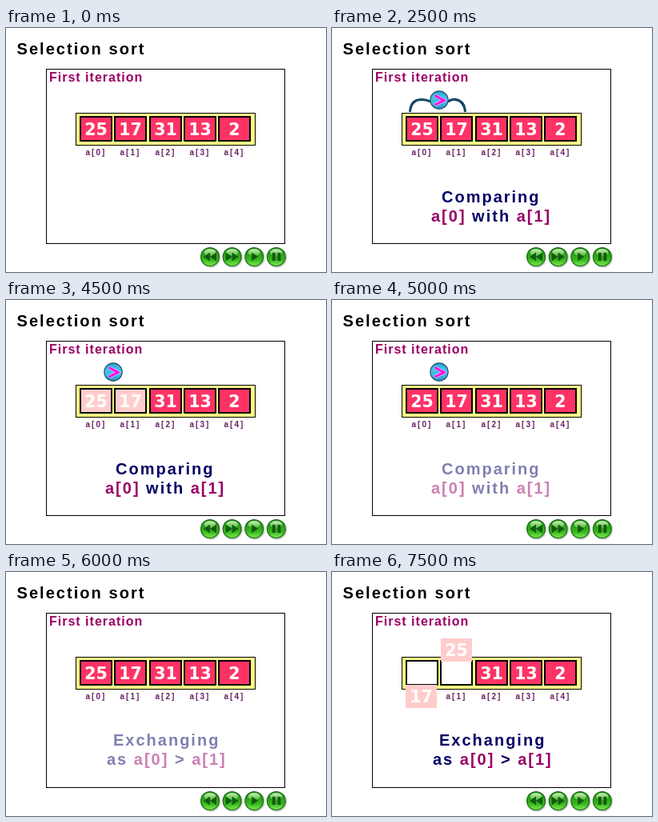
Animation, 400 px wide and 305 px high, one loop 8 s. Source, as an HTML page with a canvas:

```html
<!DOCTYPE html>
<html lang="en">
<head>
<meta charset="utf-8">
<title>Selection sort</title>
<style>
html, body { margin: 0; width: 400px; height: 305px; overflow: hidden; background: #fff; }
canvas { display: block; }
</style>
</head>
<body>
<canvas id="stage" width="400" height="305"></canvas>
<script>
const ctx = document.getElementById('stage').getContext('2d');
const LOOP = 8000, STEP = 500;
const SANS = '"Liberation Sans", Arial, sans-serif';
const WIDE = '"DejaVu Sans", Verdana, sans-serif';
const NAVY = '#000066', PLUM = '#990066', RED = '#ff3366', PALE = '#ffcccc';
const values = [25, 17, 31, 13, 2];
const cellX = i => Math.round(92 + i * 43.3);

// Draws [text, colour] runs on one baseline.
function runs(parts, x, y, size, spacing) {
  ctx.font = `bold ${size}px ${SANS}`;
  ctx.letterSpacing = spacing + 'px';
  ctx.textAlign = 'left';
  for (const [text, color] of parts) {
    ctx.fillStyle = color;
    ctx.fillText(text, x, y);
    x += ctx.measureText(text).width;
  }
}

function rect(x, y, w, h, color) {
  ctx.fillStyle = color;
  ctx.fillRect(x, y, w, h);
}

function disc(x, y, r, fill) {
  ctx.beginPath();
  ctx.arc(x, y, r, 0, Math.PI * 2);
  ctx.fillStyle = fill;
  ctx.fill();
}

function line(points, color, width) {
  ctx.beginPath();
  points.forEach(([x, y]) => ctx.lineTo(x, y));
  ctx.strokeStyle = color;
  ctx.lineWidth = width;
  ctx.stroke();
}

function number(n, x, y) {
  ctx.font = `bold 20.5px ${WIDE}`;
  ctx.letterSpacing = '0px';
  ctx.textAlign = 'center';
  ctx.fillStyle = '#fff';
  ctx.fillText(n, x, y);
}

function tile(n, x, y) {
  rect(x, y, 39, 29, PALE);
  number(n, x + 19.5, y + 22);
}

function gradient(x, y, r, stops) {
  const g = ctx.createLinearGradient(x, y - r, x, y + r);
  stops.forEach((c, i) => g.addColorStop(i / (stops.length - 1), c));
  return g;
}

function triangle(x, y, dir) {
  ctx.beginPath();
  ctx.moveTo(x, y - 5.5);
  ctx.lineTo(x + 8 * dir, y);
  ctx.lineTo(x, y + 5.5);
  ctx.fill();
}

function button(x, kind) {
  const y = 286;
  disc(x + 0.8, y + 1.2, 12.5, '#c9cec6');
  disc(x, y, 12, '#176b10');
  disc(x, y, 10.8, gradient(x, y, 11, ['#259316', '#2aa019', '#38b51e', '#78ed4b']));
  ctx.beginPath();
  ctx.ellipse(x, y - 5.5, 7.5, 4.3, 0, 0, Math.PI * 2);
  ctx.fillStyle = gradient(x, y - 5.5, 5, ['#d4f5c8', '#48b52c']);
  ctx.fill();
  ctx.fillStyle = '#125d0d';
  if (kind === 'rewind') { triangle(x, y, -1); triangle(x + 8, y, -1); }
  if (kind === 'forward') { triangle(x - 8, y, 1); triangle(x, y, 1); }
  if (kind === 'play') triangle(x - 3, y, 1);
  if (kind === 'pause') {
    ctx.fillRect(x - 5, y - 5, 4, 10);
    ctx.fillRect(x + 1.5, y - 5, 4, 10);
  }
}

function link() {
  const path = () => {
    ctx.beginPath();
    ctx.moveTo(97.5, 105);
    ctx.bezierCurveTo(98, 96, 102, 90, 111, 89.5);
    ctx.quadraticCurveTo(117, 89, 123, 92);
    ctx.moveTo(145, 92);
    ctx.quadraticCurveTo(150, 88.5, 155, 89.5);
    ctx.bezierCurveTo(163, 91, 166, 97, 166.5, 105);
  };
  for (const [color, width] of [['#08284f', 3], ['#147080', 1]]) {
    path();
    ctx.strokeStyle = color;
    ctx.lineWidth = width;
    ctx.stroke();
  }
}

function comparator() {
  disc(134, 90, 11.7, '#17455f');
  disc(134, 90, 10.6, gradient(134, 90, 11, ['#2b9fd0', '#43c3e6', '#43b9df', '#278fc0']));
  const chevron = [[129, 84.5], [140, 90.5], [129, 96]];
  line(chevron, '#f4b5ff', 4.2);
  line(chevron, '#ff00e6', 2.7);
}

function message(parts, alpha) {
  ctx.globalAlpha = alpha;
  for (const [words, x, y] of parts) runs(words, x, y, 20, 2);
  ctx.globalAlpha = 1;
}

const comparing = [
  [[['Comparing', NAVY]], 137, 218],
  [[['a[0]', PLUM], [' with ', NAVY], ['a[1]', PLUM]], 124, 242]
];
const exchanging = [
  [[['Exchanging', NAVY]], 134, 217],
  [[['as ', NAVY], ['a[0]', PLUM], [' > ', NAVY], ['a[1]', PLUM]], 126, 241]
];

const fade = (t, from, to) =>
  Math.max(0, Math.min(1, (t - from) / 1000, (to - t) / 1000));

function array(t) {
  const swapping = t >= 6500;
  const flash = t === 3500 || t === 4500;
  rect(87, 106, 225, 41, '#000');
  rect(88, 107, 223, 39, '#ffff85');
  values.forEach((n, i) => {
    const x = cellX(i), pair = i < 2;
    rect(x, 110, 41, 32, '#000');
    rect(x + 2, 112, 37, 28, pair && swapping ? '#fff' : pair && flash ? PALE : RED);
    if (!(pair && swapping)) number(n, x + 20.5, 134);
    runs([[`a[${i}]`, '#662060']], x + 7.5, 159, 10, 2);
  });
}

// The pair crosses sideways first, then drops back towards the cells.
function swap(t) {
  const across = Math.min(1, (t - 6500) / 1000);
  const drop = t >= 7500 ? 9 : 0;
  tile(25, Math.round(93 + 43 * across), 74 + drop);
  tile(17, Math.round(136 - 44 * across), 150 - drop);
}

function draw(now) {
  const t = Math.floor((now % LOOP) / STEP) * STEP;
  rect(0, 0, 400, 305, '#fff');
  runs([['Selection sort', '#000']], 13.5, 33, 20, 2.05);
  ctx.strokeStyle = '#000';
  ctx.lineWidth = 1;
  ctx.strokeRect(50.5, 51.5, 298, 218);
  runs([['First iteration', PLUM]], 54, 67, 16, 1);
  array(t);
  if (t >= 1500 && t < 3000) link();
  if (t >= 1500 && t < 6000) comparator();
  message(comparing, fade(t, 1500, 5500));
  message(exchanging, fade(t, 5500, 9000));
  if (t >= 6500) swap(t);
  ['rewind', 'forward', 'play', 'pause'].forEach((kind, i) => button(255 + i * 27.6, kind));
}

const start = performance.now();
function tick() {
  draw(performance.now() - start);
  requestAnimationFrame(tick);
}
tick();
</script>
</body>
</html>
```
